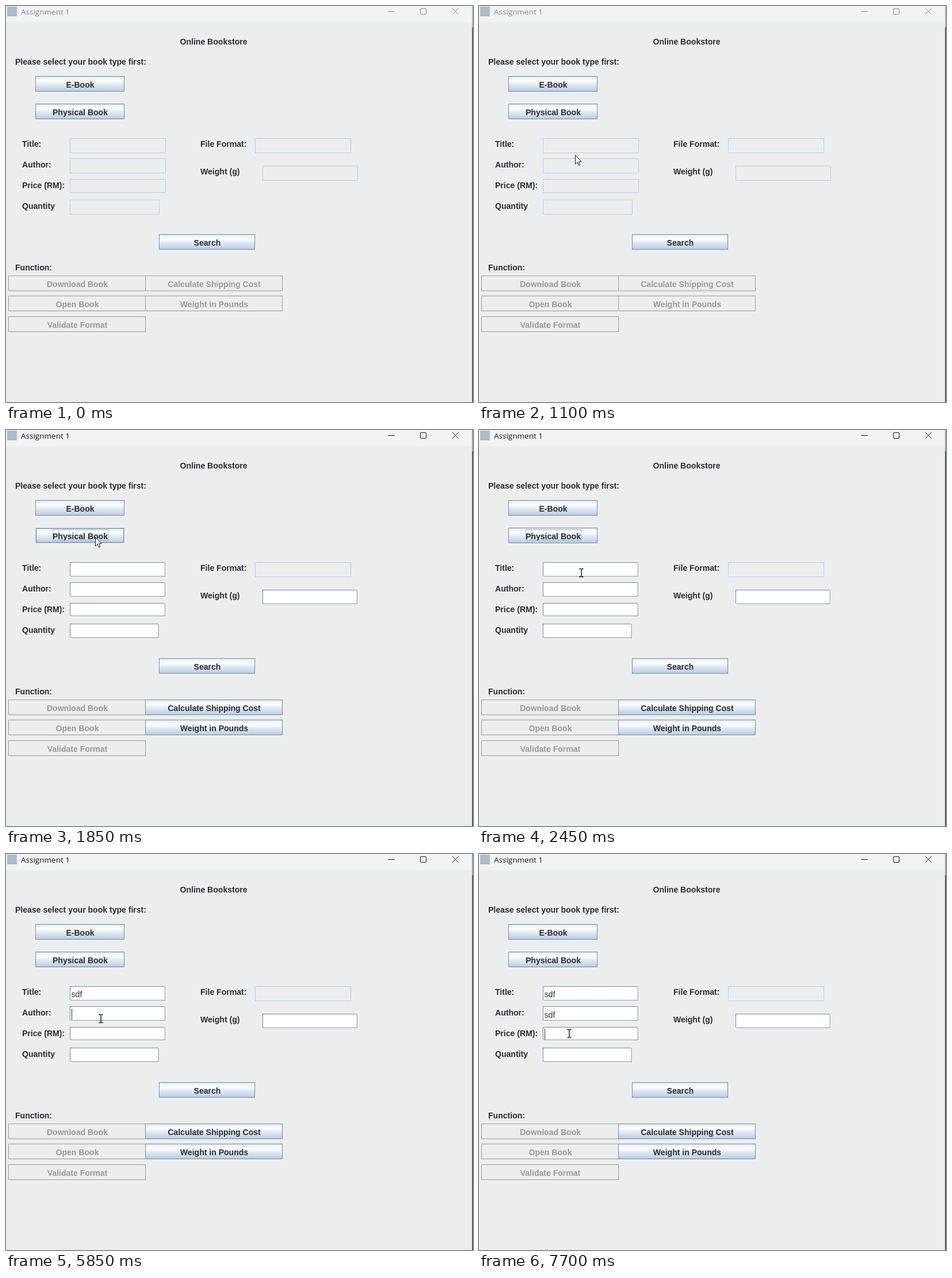
These frames come from a looping animation (812x689 px, 8000 ms). An HTML page with a canvas:

```html
<!DOCTYPE html>
<html lang="en">
<head>
<meta charset="utf-8">
<title>Online Bookstore</title>
<style>
html, body { margin: 0; width: 812px; height: 689px; overflow: hidden; background: #eceeee; }
canvas { display: block; }
</style>
</head>
<body>
<canvas id="stage" width="812" height="689"></canvas>
<script>
const ctx = document.getElementById('stage').getContext('2d');
const LOOP = 8000, PRESS = 1750, RELEASE = 1830, BLINK = 490;
const FACE = '#eceeee', INK = '#2b2b2e', EDGE = '#7a8a99', PALE = '#b8cfe5', GREY = '#999';
const BOLD = 'bold 14.05px "Liberation Sans", Arial, sans-serif';
const PLAIN = '14.2px "Liberation Sans", Arial, sans-serif';
const ROW = 35.7;
const rowY = (top, i) => Math.floor(top + ROW * i);

const field = (x, y, w, h = 25, editable = true) => ({ x, y, w, h, editable });
const inputs = [0, 1, 2, 3].map(i => field(111, rowY(230, i), i === 3 ? 155 : 166, i === 2 ? 23 : 25));
const fields = [...inputs, field(433, 230, 166, 25, false), field(446, 278, 165)];

// enabled: 'always', 'chosen' (after picking a physical book) or 'never'
const button = (label, x, y, w, enabled = 'always') => ({ label, x, y, w, h: 26, enabled });
const physical = button('Physical Book', 51, 170, 154);
const buttons = [
  button('E-Book', 51, 122, 154), physical, button('Search', 266, 397, 166),
  ...['Download Book', 'Open Book', 'Validate Format']
    .map((s, i) => button(s, 4, rowY(469, i), 238, 'never')),
  ...['Calculate Shipping Cost', 'Weight in Pounds']
    .map((s, i) => button(s, 242, rowY(469, i), 238, 'chosen'))
];

// pointer moves: start, end, destination, optional bend point
const origin = [684, 680];
const moves = [
  { from: 230, to: 1030, at: [167, 260], bend: [-140, 330] },
  { from: 1070, to: 1510, at: [155, 186] },
  { from: 1870, to: 2450, at: [178, 248] },
  { from: 5320, to: 5780, at: [165, 286] },
  { from: 7040, to: 7600, at: [157, 312] }
];
// clicks and key strokes: time, input row, letter
const events = [
  [2580, 0, ''], [3160, 0, 's'], [4730, 0, 'd'], [5010, 0, 'f'],
  [5800, 1, ''], [6380, 1, 's'], [6630, 1, 'd'], [6860, 1, 'f'],
  [7640, 2, '']
];

function text(s, x, y, color = INK, font = BOLD) {
  ctx.font = font;
  ctx.fillStyle = color;
  ctx.fillText(s, x, y);
}

function fill(x, y, w, h, color) {
  ctx.fillStyle = color;
  ctx.fillRect(x, y, w, h);
}

function frame(x, y, w, h, color) {
  ctx.strokeStyle = color;
  ctx.lineWidth = 1;
  ctx.strokeRect(x + .5, y + .5, w, h);
}

function stroke(d, color, width = 1) {
  ctx.strokeStyle = color;
  ctx.lineWidth = width;
  ctx.stroke(new Path2D(d));
}

function inside({ x, y, w, h }, [px, py]) {
  return px >= x && px <= x + w && py >= y && py <= y + h;
}

function drawWindow(active) {
  fill(0, 0, 812, 689, FACE);
  fill(0, 0, 812, 28, '#f3f3f3');
  fill(2, 1, 17, 17, '#a9bccb');
  const color = active ? '#111' : '#868686';
  text('Assignment 1', 26, 15, color, '13.5px "Open Sans", "Noto Sans", sans-serif');
  stroke('M664 9.5h12M776 4l11 11m0 -11l-11 11', color);
  ctx.beginPath();
  ctx.roundRect(720.5, 4.5, 10, 10, 1.5);
  ctx.stroke();
  fill(810.5, 0, 1.5, 37, active ? '#7f93a8' : '#9db2c8');
  fill(810.5, 37, 1.5, 652, active ? '#30343a' : '#3c4148');
}

function drawLabels() {
  text('Online Bookstore', 302.5, 67);
  text('Please select your book type first:', 16, 102);
  ['Title:', 'Author:', 'Price (RM):', 'Quantity'].forEach((s, i) => text(s, 28, 245 + 36 * i));
  text('File Format:', 338, 245);
  text('Weight (g)', 338, 293);
  text('Function:', 16, 460);
}

function drawField({ x, y, w, h, editable }, chosen) {
  if (!editable || !chosen) return frame(x, y, w, h, PALE);
  fill(x, y, w + 1, h + 1, '#fff');
  frame(x, y, w - 1, h - 1, EDGE);
  fill(x, y + h - 1, 1, 1, FACE);
  fill(x + w - 1, y, 1, 1, FACE);
}

function drawButton({ label, x, y, w, h, enabled }, chosen, hover, pressed) {
  const on = enabled === 'always' || (enabled === 'chosen' && chosen);
  if (on) {
    const g = ctx.createLinearGradient(0, y, 0, y + h);
    g.addColorStop(0, '#dde8f3');
    g.addColorStop(.3, '#fff');
    g.addColorStop(.6, '#dde8f3');
    g.addColorStop(1, PALE);
    fill(x, y, w, h, pressed ? PALE : g);
  }
  frame(x, y, w, h, hover ? PALE : on ? EDGE : GREY);
  if (hover) frame(x + 1, y + 1, w - 2, h - 2, EDGE);
  ctx.textAlign = 'center';
  text(label, x + w / 2 + 1, y + 19.5, on ? INK : GREY);
  ctx.textAlign = 'left';
}

function pointerAt(t) {
  let p = origin;
  for (const { from, to, at, bend } of moves) {
    if (t < from) break;
    const k = Math.min(1, (t - from) / (to - from));
    const u = k * k * (3 - 2 * k), start = p;
    const mid = bend || start.map((v, i) => (v + at[i]) / 2);
    p = start.map((v, i) => (1 - u) ** 2 * v + 2 * u * (1 - u) * mid[i] + u * u * at[i]);
  }
  return p.map(Math.round);
}

function drawPointer([x, y], overField) {
  ctx.save();
  if (overField) {
    ctx.translate(x, y);
    stroke('M-3.5 -6.5h3m1 0h3M0 -6V7M-3.5 7.5h3m1 0h3', '#000', 1.3);
  } else {
    ctx.translate(x + .5, y + .5);
    const arrow = 'M0 0V15.5L3.6 12.2L6 17.8L8.3 16.8L6 11.3H10.6Z';
    ctx.fillStyle = '#fff';
    ctx.fill(new Path2D(arrow));
    stroke(arrow, '#111');
  }
  ctx.restore();
}

function drawTyping(t) {
  const past = events.filter(e => e[0] <= t);
  if (!past.length) return;
  const entry = row => past.filter(e => e[1] === row).map(e => e[2]).join('');
  [0, 1].forEach(row => text(entry(row), 113.5, 249 + 36 * row, '#333', PLAIN));

  // the caret restarts its blinking at every click and key stroke
  const [since, row] = past[past.length - 1];
  if (Math.floor((t - since) / BLINK) % 2) return;
  const x = Math.round(113.6 + ctx.measureText(entry(row)).width);
  fill(x, 234 + 35 * row, 1, 19, '#333');
}

function draw(t) {
  const chosen = t >= RELEASE, pointer = pointerAt(t);
  drawWindow(t >= PRESS);
  drawLabels();
  fields.forEach(f => drawField(f, chosen));
  buttons.forEach(b => drawButton(b, chosen,
    b.enabled === 'always' && inside(b, pointer),
    b === physical && t >= PRESS && t < RELEASE));
  if (t >= PRESS && t < events[0][0]) frame(81, 173, 96, 19, '#a3b8cc');
  drawTyping(t);
  if (t >= moves[0].from) drawPointer(pointer, chosen && inputs.some(f => inside(f, pointer)));
}

function tick() {
  draw(performance.now() % LOOP);
  requestAnimationFrame(tick);
}
tick();
</script>
</body>
</html>
```
